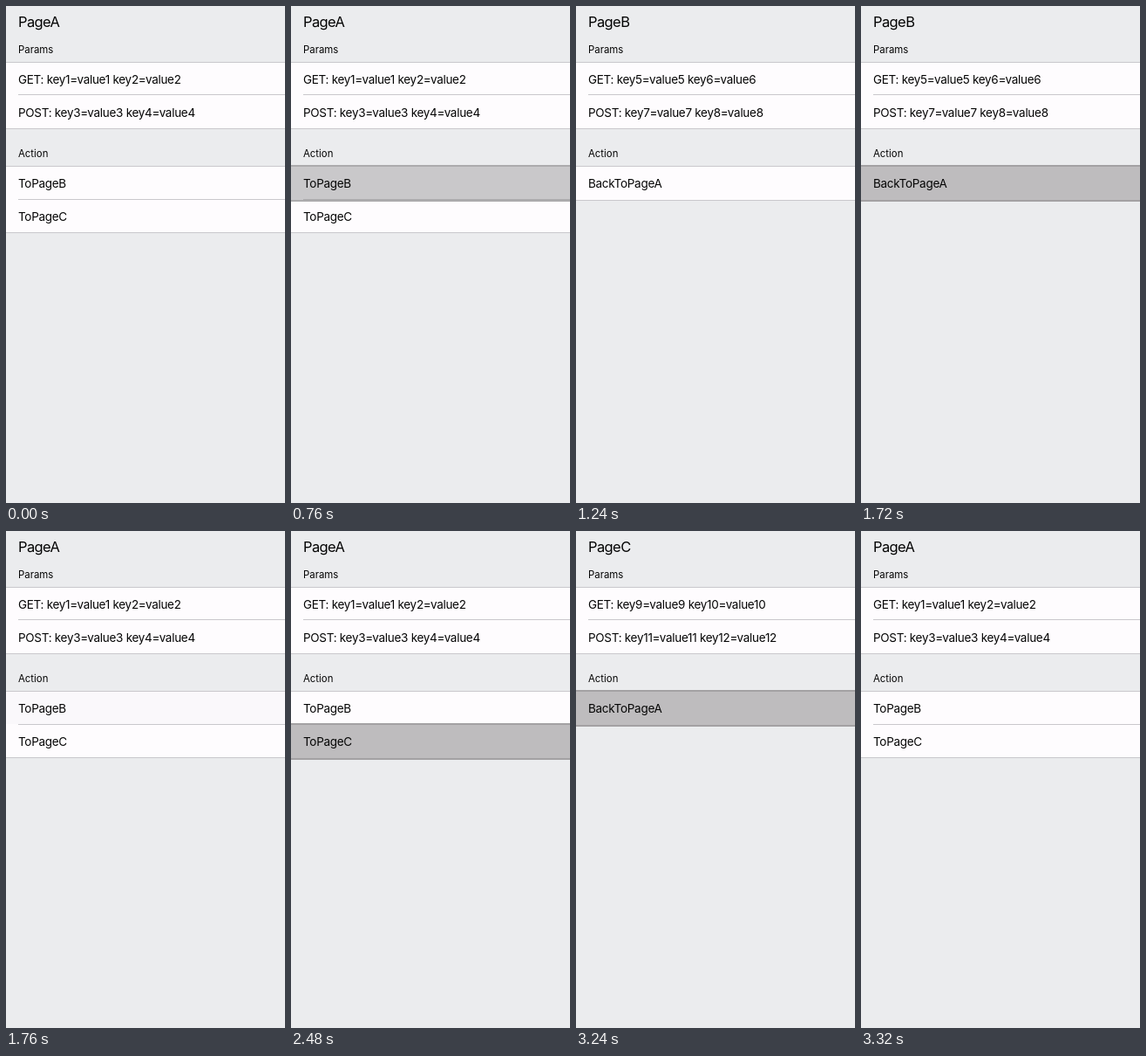
Write an HTML page with a canvas that moves like this. It is 320 by 569 pixels and loops after 3.76 s.

```html
<!DOCTYPE html>
<html lang="en">
<head>
<meta charset="utf-8">
<title>Page navigation</title>
<style>
html, body { margin: 0; height: 100%; overflow: hidden; background: #ebecee; }
canvas { display: block; }
</style>
</head>
<body>
<canvas id="stage" width="320" height="569"></canvas>
<script>
const ctx = document.getElementById('stage').getContext('2d');
const LOOP = 3760, ROW = 37.6, HAIR = 0.8, LEFT = 14;
const LINE = '#c9c8cc', WHITE = '#fefcfe';

const pages = {
  A: { params: ['GET: key1=value1 key2=value2', 'POST: key3=value3 key4=value4'], actions: ['ToPageB', 'ToPageC'] },
  B: { params: ['GET: key5=value5 key6=value6', 'POST: key7=value7 key8=value8'], actions: ['BackToPageA'] },
  C: { params: ['GET: key9=value9 key10=value10', 'POST: key11=value11 key12=value12'], actions: ['BackToPageA'] }
};

const looks = {
  press: { fill: '#c9c8ca', edge: '#acabad', divider: true },
  held: { fill: '#bebcbe', edge: '#a3a1a3' },
  fade: { fill: '#faf8fb' }
};

// start time, page, pressed row, look of that row
const steps = [
  [0, 'A'],
  [760, 'A', 0, 'press'],
  [800, 'A', 0, 'held'],
  [1200, 'B', 0, 'fade'],
  [1240, 'B'],
  [1720, 'B', 0, 'held'],
  [1760, 'A', 0, 'fade'],
  [2480, 'A', 1, 'held'],
  [2520, 'C', 0, 'fade'],
  [2560, 'C'],
  [3240, 'C', 0, 'held'],
  [3280, 'A', 0, 'fade'],
  [3320, 'A']
];

function rect(color, x, y, w, h) {
  ctx.fillStyle = color;
  ctx.fillRect(x, y, w, h);
}

function line(x, y) {
  rect(LINE, x, Math.round(y), 320, 1);
}

function text(str, y, size, spacing) {
  ctx.font = `${size}px Inter, sans-serif`;
  ctx.letterSpacing = spacing + 'px';
  ctx.fillStyle = '#050505';
  ctx.fillText(str, LEFT, y);
}

function list(rows, top, pressed, look) {
  const first = Math.round(top), bottom = top + rows.length * ROW + HAIR;
  rect(WHITE, 0, first, 320, Math.round(bottom) - first);
  line(0, top);
  line(0, bottom);
  for (let i = 1; i < rows.length; i++) line(LEFT, top + i * ROW);
  if (look) highlight(Math.round(top + pressed * ROW), looks[look]);
  rows.forEach((row, i) => text(row, first + 25 + i * 37.5, 13.5, -0.29));
}

function highlight(y, { fill, edge, divider }) {
  if (!edge) return rect(fill, 0, y + 1, 320, 37);
  rect(edge, 0, y - 1, 320, 42);
  rect(fill, 0, y + 1, 320, 38);
  if (divider) rect(edge, LEFT, y + 38, 320, 1);
}

function draw(now) {
  const t = now % LOOP;
  const [, name, pressed, look] = steps.findLast(step => step[0] <= t);
  const page = pages[name];
  rect('#ebecee', 0, 0, 320, 569);
  text('Page' + name, 24, 16.5, -0.6);
  text('Params', 53.5, 11.4, 0);
  list(page.params, 63.6);
  text('Action', 173, 11.4, 0);
  list(page.actions, 183.4, pressed, look);
}

const start = performance.now();
function tick() {
  draw(performance.now() - start);
  requestAnimationFrame(tick);
}
tick();
</script>
</body>
</html>
```
